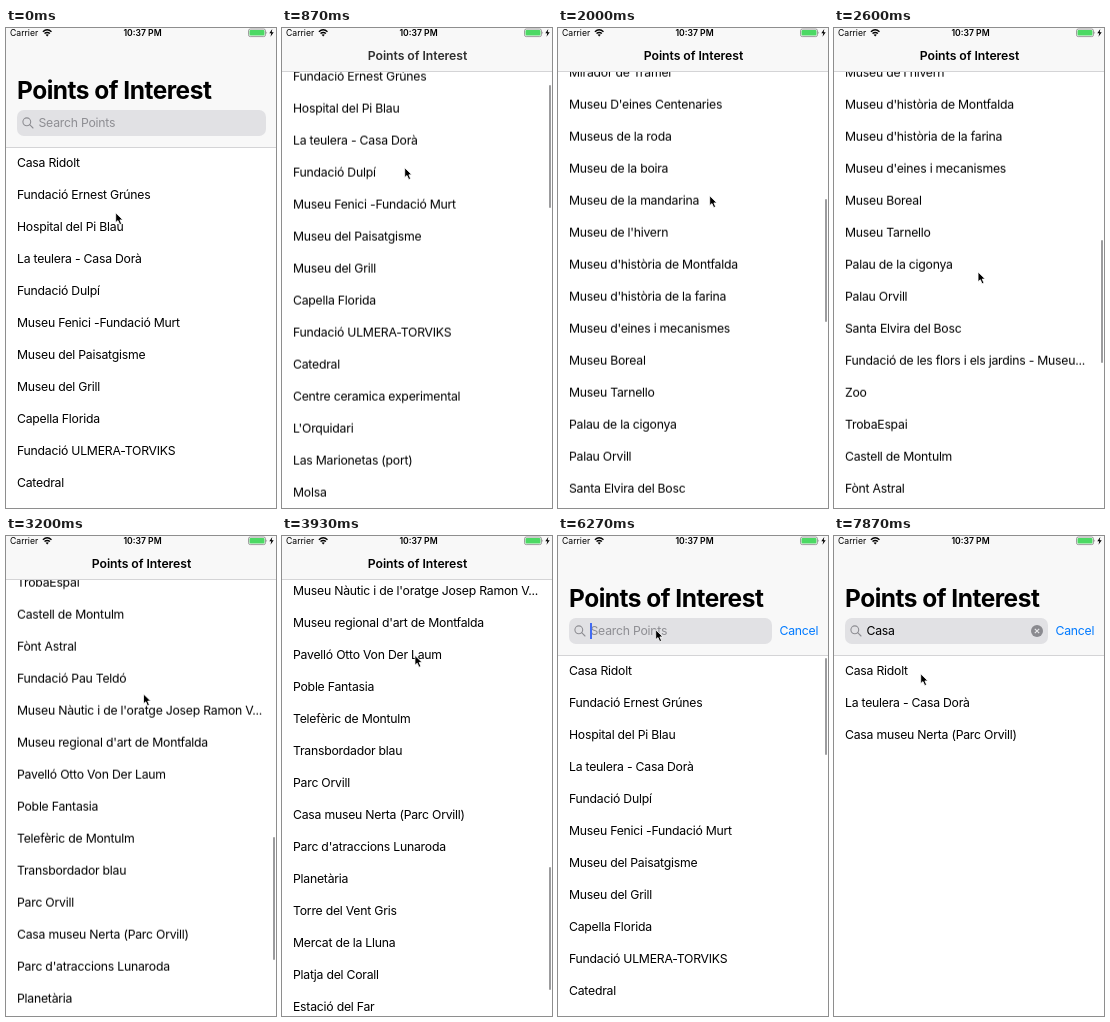
Animation, 270 px wide and 480 px high, one loop 8000 ms. Source, as an HTML page:

```html
<!DOCTYPE html>
<html lang="ca">
<head>
<meta charset="utf-8">
<title>Points of Interest</title>
<style>
  html, body { margin: 0; width: 100%; height: 100%; overflow: hidden; background: #fff; }
  #stage {
    position: relative; width: 270px; height: 480px; overflow: hidden; background: #fff;
    font: 12.24px/32px Inter, Roboto, sans-serif; letter-spacing: -.23px; color: #000; white-space: nowrap;
  }
  #stage div, #stage svg { position: absolute; }
  #list { left: 11px; top: 119px; will-change: transform; }
  #list div { left: 0; }
  #header { left: 0; top: 0; width: 270px; box-sizing: border-box; background: #f8f8f8; border-bottom: 1px solid #d4d4d6; }
  #large { left: 0; top: 44px; width: 270px; bottom: 0; overflow: hidden; }
  #heading { left: 11px; top: 1px; font-size: 24.48px; line-height: 34px; font-weight: 700; letter-spacing: -.5px; }
  #field { left: 11px; top: 38px; height: 26px; border-radius: 7px; background: #e1e1e4; overflow: hidden; }
  #field svg { left: 5px; top: 7px; }
  #query { left: 21.5px; top: 0; line-height: 26px; }
  #caret { top: 5px; width: 1.5px; height: 16px; background: #426bf2; }
  #field #clear { left: auto; right: 5px; top: 7px; }
  #cancel { left: 221.5px; top: 38px; line-height: 26px; color: #007aff; }
  #inline { left: 0; width: 271px; top: 18px; line-height: 20px; text-align: center; font-weight: 600; letter-spacing: -.05px; }
  .status { top: 0; font-size: 8.64px; line-height: 10px; letter-spacing: 0; }
  #clock { left: 0; width: 273px; text-align: center; font-weight: 600; }
  #bar { left: 267px; width: 2px; border-radius: 1px; background: #9c9c9e; }
  #pointer { left: -.8px; top: 0; }
</style>
</head>
<body>
<div id="stage">
  <div id="list"></div>
  <div id="header">
    <div id="large">
      <div id="heading">Points of Interest</div>
      <div id="field">
        <svg width="12" height="12" fill="none" stroke="#8e8e93" stroke-width="1.1" stroke-linecap="round"><circle cx="4.8" cy="4.8" r="3.9"/><path d="M7.7 7.7L11 11"/></svg>
        <div id="query"></div>
        <div id="caret"></div>
        <svg id="clear" width="12" height="12"><circle cx="6" cy="6" r="6" fill="#8a8a8f"/><path d="M3.8 3.8l4.4 4.4m0-4.4l-4.4 4.4" stroke="#e8e8ea" stroke-width="1.1"/></svg>
      </div>
      <div id="cancel">Cancel</div>
    </div>
    <div id="inline">Points of Interest</div>
    <div class="status" style="left:4px">Carrier</div>
    <svg style="left:36px;top:0" width="11" height="10" fill="none" stroke="#000" stroke-width="1.4">
      <path d="M.9 3.7Q5.2 -.3 9.5 3.7M2.5 5.6Q5.2 3.2 7.9 5.6"/><path d="M3.6 6.8Q5.2 5.5 6.8 6.8L5.2 8.5z" fill="#000" stroke="none"/>
    </svg>
    <div class="status" id="clock">10:37 PM</div>
    <svg style="left:242px;top:0" width="28" height="10">
      <rect x=".5" y="1" width="17" height="7.6" rx="1.8" fill="none" stroke="#777" stroke-width=".7"/>
      <rect x="1.5" y="2" width="15" height="5.6" rx="1" fill="#4cd964"/>
      <path d="M18.5 3.5q1.3 1.3 0 2.6z" fill="#777"/><path d="M24.3 1l-3 4.3h2l-.8 3.5 3.2-4.6h-2z"/>
    </svg>
  </div>
  <div id="bar"></div>
  <svg id="pointer" width="10" height="15"><path d="M.7 .8V10.6L3 8.6L4.7 12.6L6.6 11.8L4.9 7.9H7.9z" stroke="#fff" stroke-width=".8"/></svg>
</div>
<script>
const LOOP = 8000, ROW = 32, FULL = 120, COMPACT = 44;

const places = `Casa Ridolt
Fundació Ernest Grúnes
Hospital del Pi Blau
La teulera - Casa Dorà
Fundació Dulpí
Museu Fenici -Fundació Murt
Museu del Paisatgisme
Museu del Grill
Capella Florida
Fundació ULMERA-TORVIKS
Catedral
Centre ceramica experimental
L'Orquidari
Las Marionetas (port)
Molsa
Mirador de Tramel
Museu D'eines Centenaries
Museus de la roda
Museu de la boira
Museu de la mandarina
Museu de l'hivern
Museu d'història de Montfalda
Museu d'història de la farina
Museu d'eines i mecanismes
Museu Boreal
Museu Tarnello
Palau de la cigonya
Palau Orvill
Santa Elvira del Bosc
Fundació de les flors i els jardins - Museu...
Zoo
TrobaEspai
Castell de Montulm
Fònt Astral
Fundació Pau Teldó
Museu Nàutic i de l'oratge Josep Ramon V...
Museu regional d'art de Montfalda
Pavelló Otto Von Der Laum
Poble Fantasia
Telefèric de Montulm
Transbordador blau
Parc Orvill
Casa museu Nerta (Parc Orvill)
Parc d'atraccions Lunaroda
Planetària
Torre del Vent Gris
Mercat de la Lluna
Platja del Corall
Estació del Far`.split('\n');

// [time, value...]
const scrollKeys = [[530, 0], [870, 118], [1300, 310], [1550, 350], [2000, 570], [2400, 690],
  [2600, 730], [3200, 1080], [3700, 1200], [4600, 1200], [4800, 923], [5100, 260], [5450, 0]];
const pointerKeys = [[70, 110, 184], [200, 117, 219], [530, 117, 219], [870, 123, 139], [1100, 127, 130],
  [1500, 142, 245], [2000, 152, 167], [2550, 145, 245], [3130, 138, 158], [3700, 137, 154],
  [4450, 122, 4], [4950, 122, 4], [5650, 98, 93], [7600, 98, 93], [7870, 87, 137]];
const typing = [[6470, 'C'], [6670, 'Ca'], [6870, 'Cas'], [7070, 'Casa']];

const $ = id => document.getElementById(id);
const clamp = (v, lo = 0, hi = 1) => Math.min(hi, Math.max(lo, v));
const ramp = (t, from, to) => { const u = clamp((t - from) / (to - from)); return u * u * (3 - 2 * u); };

// Monotone cubic interpolation of column c.
function follow(keys, t, c = 1) {
  const last = keys.length - 1;
  if (t <= keys[0][0]) return keys[0][c];
  if (t >= keys[last][0]) return keys[last][c];
  const i = keys.findIndex(k => k[0] > t) - 1;
  const slope = j => j < 0 || j >= last ? 0 : (keys[j + 1][c] - keys[j][c]) / (keys[j + 1][0] - keys[j][0]);
  const tangent = j => {
    const a = slope(j - 1), b = slope(j);
    return a * b > 0 ? 2 * a * b / (a + b) : 0;
  };
  const h = keys[i + 1][0] - keys[i][0], u = (t - keys[i][0]) / h, v = 1 - u;
  return keys[i][c] * (1 + 2 * u) * v * v + tangent(i) * h * u * v * v
    + keys[i + 1][c] * u * u * (3 - 2 * u) - tangent(i + 1) * h * u * u * v;
}

const rows = places.map(name => {
  const row = document.createElement('div');
  row.textContent = name;
  $('list').append(row);
  return row;
});

let shown = null;
function search(text) {
  if (text === shown) return;
  shown = text;
  let n = 0;
  rows.forEach((row, i) => {
    const hit = places[i].toLowerCase().includes(text.toLowerCase());
    row.style.display = hit ? '' : 'none';
    if (hit) row.style.top = ROW * n++ + 'px';
  });
  $('query').textContent = text || 'Search Points';
  $('query').style.color = text ? '#000' : '#8e8e93';
  $('caret').style.left = (text ? 22 + $('query').offsetWidth : 21) + 'px';
  $('clear').style.opacity = text ? 1 : 0;
}

function draw(t) {
  const offset = follow(scrollKeys, t);
  const nav = clamp(FULL - offset, COMPACT, FULL);
  const collapsed = (FULL - nav) / (FULL - COMPACT);
  const active = ramp(t, 5730, 6050);

  search(typing.reduce((text, [at, typed]) => t >= at ? typed : text, ''));
  $('list').style.transform = `translateY(${-offset}px)`;
  $('header').style.height = nav + 'px';
  $('heading').style.transform = `translateY(${-clamp(offset - 37, 0, 40)}px)`;
  $('field').style.height = clamp(26 - offset, 0, 26) + 'px';
  $('field').style.width = 249 - 46 * active + 'px';
  $('query').style.opacity = clamp(1 - offset / 14);
  $('cancel').style.opacity = active;
  $('caret').style.opacity = t >= 5930 && t < 7600 ? 1 : 0;
  $('inline').style.opacity = clamp((offset - 70) / 60);

  const bar = $('bar').style;
  bar.opacity = t < 6470 ? ramp(t, 530, 660) : 0;
  bar.top = nav + 2 + .2535 * Math.max(0, offset - FULL + COMPACT) + 'px';
  bar.height = 97 + 26 * collapsed + 'px';

  const pointer = $('pointer').style;
  pointer.transform = `translate(${follow(pointerKeys, t)}px,${follow(pointerKeys, t, 2)}px)`;
  pointer.opacity = t >= 6470 && t < 7600 ? 0 : 1;
}

const start = performance.now();
function tick() {
  draw((performance.now() - start) % LOOP);
  requestAnimationFrame(tick);
}
tick();
</script>
</body>
</html>
```
